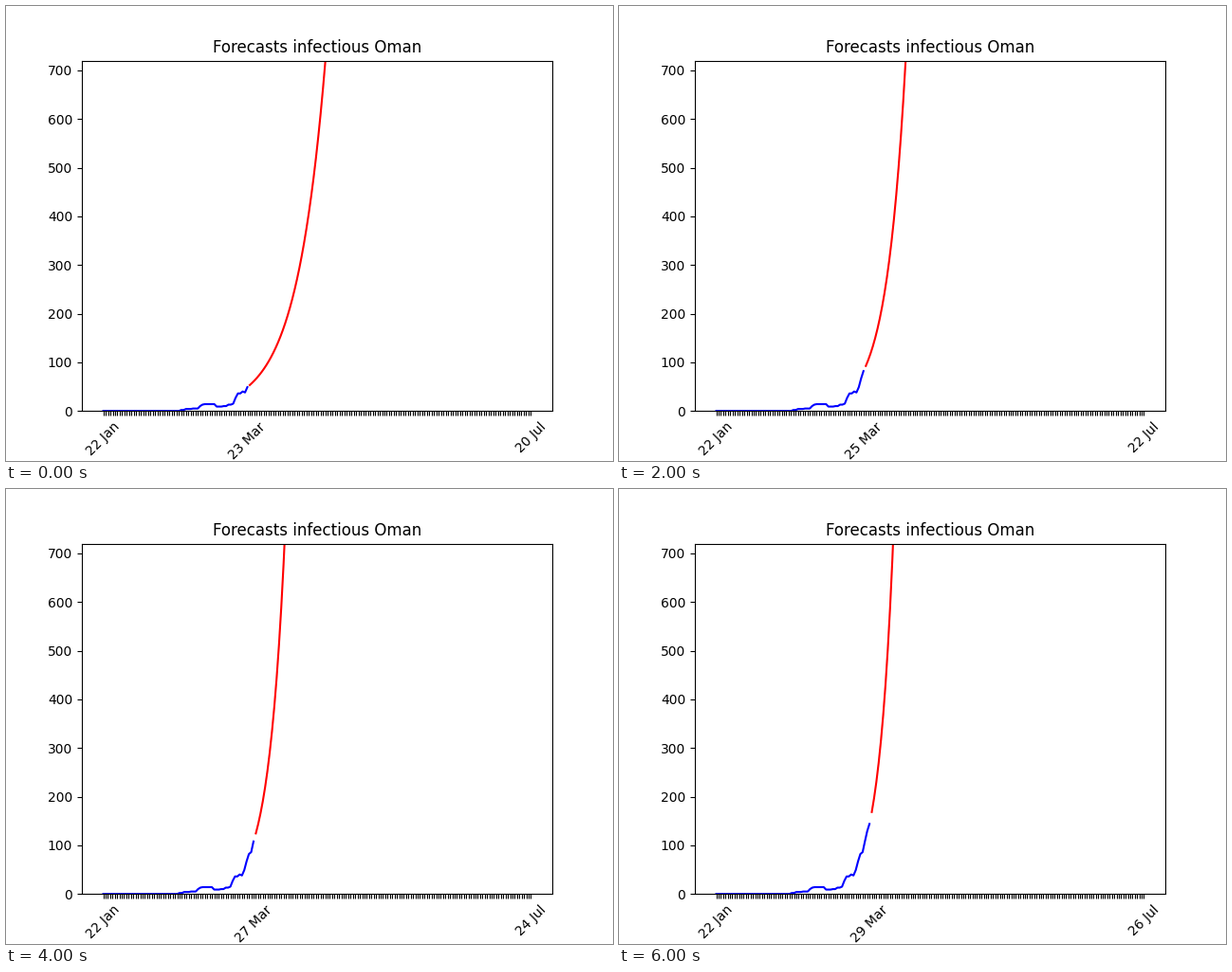
Animation, 640 px wide and 480 px high, one loop 7000 ms. Source, as a matplotlib script:

```python
import matplotlib.pyplot as plt
import numpy as np
from matplotlib.animation import FuncAnimation

# Active cases per day: a run of zeros from 22 Jan, then the outbreak.
CASES = np.array(
    [0] * 33 + [2] * 2 + [4] * 3 + [5] * 3 + [10, 13] + [14] * 5
    + [9] * 3 + [10] * 2 + [13] * 2
    + [15, 27, 36, 36, 40, 38, 49, 67, 82, 86, 108, 129, 144]
)
# Daily growth rate estimated on each successive day.
RATES = [0.0814, 0.1035, 0.1205, 0.1305, 0.1413, 0.1519, 0.1562]
HORIZON = 120
FIRST = len(CASES) - len(RATES) + 1

fig, ax = plt.subplots(figsize=(6.4, 4.8), dpi=100)


def draw(i):
    known = FIRST + i
    total = known + HORIZON
    past = CASES[:known]
    future = past[-1] * np.exp(RATES[i] * np.arange(1, HORIZON + 1))

    labels = [""] * total
    labels[0] = "22 Jan"
    labels[known - 1] = f"{23 + i} Mar"
    labels[-1] = f"{20 + i} Jul"

    ax.clear()
    ax.plot(np.arange(known), past, color="blue")
    ax.plot(np.arange(known, total), future, color="red")
    ax.set_xticks(np.arange(total), labels, rotation=45)
    ax.set_ylim(0, 5 * CASES[-1])
    ax.set_title("Forecasts infectious Oman")


anim = FuncAnimation(fig, draw, frames=len(RATES), interval=1000,
                     init_func=lambda: draw(0), repeat=True, repeat_delay=0)
plt.show()
```
